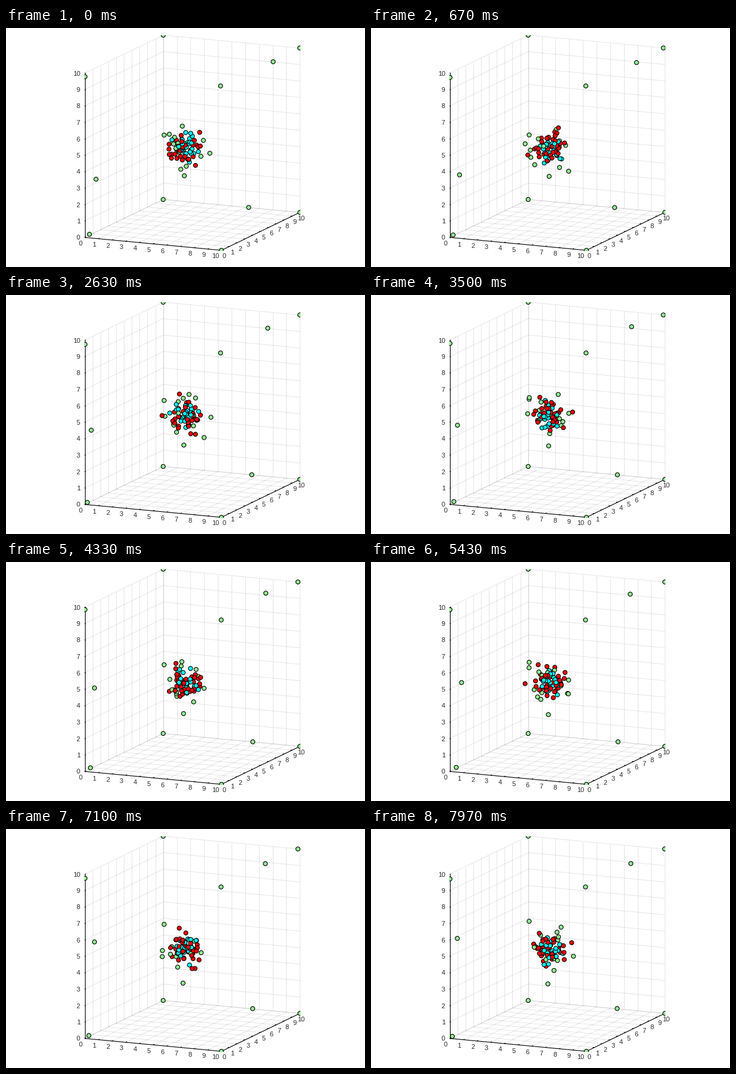
A matplotlib script that plays this animation: 600x400 px, repeating every 8000 ms.

```python
import numpy as np
import matplotlib.pyplot as plt
from matplotlib.animation import FuncAnimation
from matplotlib.collections import LineCollection
from matplotlib.patches import Rectangle

W, H, DPI = 600, 400, 100
FRAMES, LOOP = 240, 8000
PX = 72 / DPI
GREEN, RED, CYAN = "#90ee90", "#ff0000", "#00ffff"

ORIGIN = np.array([131.5, 350.5])
AXES = np.array([[22.85, 2.16], [13.12, -6.35], [0, -27.5]])
CENTER = np.array([299, 202])


def project(x, y, z):
    """Box coordinates (0 to 10) to stage pixels."""
    return ORIGIN + np.array([x, y, z]) @ AXES


fig = plt.figure(figsize=(W / DPI, H / DPI), dpi=DPI, facecolor="white")
ax = fig.add_axes([0, 0, 1, 1])
ax.set_xlim(0, W)
ax.set_ylim(H, 0)
ax.axis("off")


def add_lines(segments, **style):
    ax.add_collection(LineCollection(segments, **style))


def label(pos, dx, dy, text):
    ax.text(pos[0] + dx, pos[1] + dy, text, ha="right", va="baseline",
            family="Liberation Sans", size=11 * PX, color="#262626")


# Grid on the floor, the left wall and the back wall
grid, ticks = [], []
for k in range(11):
    grid += [
        [project(k, 0, 0), project(k, 10, 0)],
        [project(0, k, 0), project(10, k, 0)],
        [project(0, k, 0), project(0, k, 10)],
        [project(0, 0, k), project(0, 10, k)],
        [project(k, 10, 0), project(k, 10, 10)],
        [project(0, 10, k), project(10, 10, k)],
    ]
    px, py, pz = project(k, 0, 0), project(10, k, 0), project(0, 0, k)
    ticks += [[px, px + [2, -1]], [py, py + [-2.5, -0.2]], [pz, pz + [2, 0.2]]]
    label(px, -4, 13.3, k)
    label(py, 8, 13.3, k)
    label(pz, -7.5, 4, k)

add_lines(grid, colors="black", alpha=0.1, linewidths=PX, zorder=1)
box_edges = [
    [project(0, 0, 0), project(10, 0, 0)],
    [project(10, 0, 0), project(10, 10, 0)],
    [project(0, 0, 0), project(0, 0, 10)],
]
add_lines(box_edges + ticks, colors="black", linewidths=1.1 * PX, zorder=2)

rng = np.random.default_rng(26)
t = np.arange(FRAMES) * LOOP / FRAMES / 1000
paths, colors = [], []


def add(x, y, color=GREEN):
    paths.append(np.column_stack([x + 0 * t, y + 0 * t]))
    colors.append(color)


def sway(period, peak):
    """Cosine that is highest at the given second."""
    return np.cos(2 * np.pi * (t - peak) / period)


def swarm(count, color, low, mode, high):
    """Circular orbits, tilted at random, around the middle of the cluster."""
    for _ in range(count):
        radius = rng.triangular(low, mode, high)
        plane, _ = np.linalg.qr(rng.normal(size=(3, 2)))
        angle = 2 * np.pi * (t / rng.uniform(1, 2.5) + rng.random())
        orbit = np.column_stack([np.cos(angle), np.sin(angle)]) @ plane[:2].T
        x, y = (CENTER + radius * orbit).T
        add(x, y, color)


# Particles held in the corners of the box
for corner in [(10, 0, 0), (10, 10, 0), (0, 10, 0), (0, 10, 10)]:
    add(*project(*corner))
step = sway(6.8, 5.3)
add(138.8 + 3.7 * step, 345.6 - 1.9 * step)
add(132, 81.5 + 2 * sway(6.5, 1.6))
add(489.3 + 1.8 * sway(2.8, 2.6), 33.4)
add(359.2 + 0.7 * sway(2.6, 1.4), 97)

# Particles drifting slowly
add(147 + 4.5 * sway(6.4, 5.7), 253 - 11 * t + 0.28 * t**2)
add(446.5 - 4.4 * t + 0.36 * t**2, 55.2 - 3 * sway(6.3, 4.3))
add(405.5 + 2.65 * t - 0.24 * t**2, 300.3 + 0.3 * t - 0.035 * t**2)
add(298 - 0.3 * t, 247.3 + 1.5 * t)
add(264.3, 179.2 - 0.39 * t**2)

inner = len(paths)
swarm(36, RED, 6, 20, 44)
swarm(27, CYAN, 4, 13, 34)
swarm(13, GREEN, 14, 34, 62)

order = np.r_[:inner, inner + rng.permutation(len(paths) - inner)]
paths = np.array(paths)[order]
colors = [colors[i] for i in order]

dots = ax.scatter(paths[:, 0, 0], paths[:, 0, 1], s=(7 * PX) ** 2, c=colors,
                  edgecolors="black", linewidths=1.1 * PX, zorder=3)
dots.set_clip_path(Rectangle((131, 11.5), 361, 361, transform=ax.transData))


def draw(i):
    dots.set_offsets(paths[:, i])
    return (dots,)


anim = FuncAnimation(fig, draw, frames=FRAMES, interval=LOOP / FRAMES,
                     repeat=True, repeat_delay=0, blit=False)
plt.show()
```
